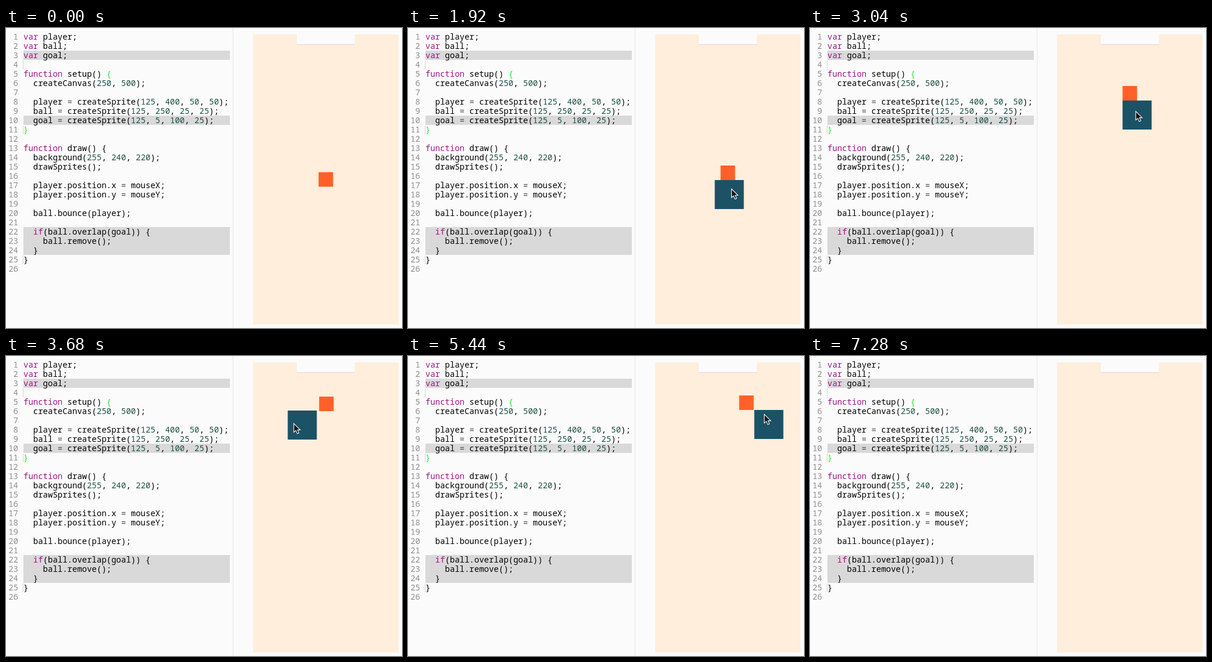
Animation of 681 by 517 pixels, one loop 7520 ms. Source, as an HTML page:

```html
<!DOCTYPE html>
<html lang="en">
<head>
<meta charset="utf-8">
<title>Push the ball to the goal</title>
<style>
  html, body { margin: 0; width: 100%; height: 100%; overflow: hidden; background: #fbfbfb; }
  svg { display: block; width: 681px; height: 517px; }
  text { font: 500 14px "Noto Sans Mono", "DejaVu Sans Mono", monospace; white-space: pre; fill: #000; }
  .num { fill: #8f8f8f; text-anchor: end; }
  .keyword { fill: #9c1583; }
  .number { fill: #1d5145; }
  .operator { fill: #444; }
  .match { fill: #1eea2c; }
</style>
</head>
<body>
<svg viewBox="0 0 681 517">
  <defs><clipPath id="canvas"><rect x="425" y="11" width="250" height="500"/></clipPath></defs>
  <rect width="681" height="517" fill="#fbfbfb"/>
  <path d="M30 39h355v16H30zM30 151h355v16H30zM30 343h355v48H30z" fill="#d9d9d9"/>
  <path d="M29.5 56v15M29.5 168v15M29.5 392v15" stroke="#d4d4d4"/>
  <path d="M390.5 0v517" stroke="#e6e6e6"/>
  <g id="code"></g>
  <rect x="425" y="11" width="250" height="500" fill="#ffeedb"/>
  <g clip-path="url(#canvas)">
    <rect x="500" y="11" width="100" height="17" fill="#fbfbfb"/>
    <path d="M500 28.5h100" stroke="#f3c8e6"/>
    <rect id="player" width="50" height="50" fill="#1b5266"/>
    <rect id="ball" width="25" height="25" fill="#ff6029"/>
  </g>
  <path id="cursor" d="M0 0V15L3.5 12 6 17.5 8.7 16.4 6.3 11H11Z" fill="#111" stroke="#fff" stroke-width="1.1"/>
</svg>
<script>
const LOOP = 7520, STEP = 80, LEAD = 60;
const $ = id => document.getElementById(id);

const source = `var player;
var ball;
var goal;

function setup() {
  createCanvas(250, 500);

  player = createSprite(125, 400, 50, 50);
  ball = createSprite(125, 250, 25, 25);
  goal = createSprite(125, 5, 100, 25);
}

function draw() {
  background(255, 240, 220);
  drawSprites();

  player.position.x = mouseX;
  player.position.y = mouseY;

  ball.bounce(player);

  if(ball.overlap(goal)) {
    ball.remove();
  }
}
`;

function highlight(line, row) {
  if (row === 4 || row === 10) line = line.replace(/[{}]/, '<tspan class="match">$&</tspan>');
  return line
    .replace(/ = /, ' <tspan class="operator">=</tspan> ')
    .replace(/\b\d+\b/g, '<tspan class="number">$&</tspan>')
    .replace(/\b(var|function|if)\b/, '<tspan class="keyword">$&</tspan>');
}

$('code').innerHTML = source.split('\n').map((line, row) => {
  const y = 20 + row * 16;
  return `<text class="num" x="21" y="${y}">${row + 1}</text>` +
    `<text x="30" y="${y}">${highlight(line, row)}</text>`;
}).join('');

// Turning points of the mouse, joined by a smooth curve
const path = [
  { t: 720, x: 464, y: 535 },
  { t: 1440, x: 500, y: 360 },
  { t: 1920, x: 552, y: 287 },
  { t: 2560, x: 583, y: 212 },
  { t: 3040, x: 562, y: 150 },
  { t: 3200, x: 559, y: 144 },
  { t: 3340, x: 559, y: 144 },
  { t: 3680, x: 509, y: 119 },
  { t: 3920, x: 460, y: 120 },
  { t: 4320, x: 544, y: 84 },
  { t: 4560, x: 505, y: 130 },
  { t: 4800, x: 562, y: 171 },
  { t: 5280, x: 628, y: 150 },
  { t: 5760, x: 589, y: 59 },
  { t: 6590, x: 589, y: 59 },
  { t: 7280, x: 570, y: 580 }
];

const same = (a, b) => a.x === b.x && a.y === b.y;

function slope(i, axis) {
  const a = path[i - 1], b = path[i], c = path[i + 1];
  if (!a || !c || same(a, b) || same(b, c)) return 0;
  return (c[axis] - a[axis]) / (c.t - a.t);
}

function mouseAt(t) {
  const last = path.length - 1;
  t = Math.min(Math.max(t, path[0].t), path[last].t);
  let i = 0;
  while (i < last - 1 && path[i + 1].t <= t) i++;
  const a = path[i], b = path[i + 1], span = b.t - a.t;
  const u = (t - a.t) / span, v = 1 - u;
  return ['x', 'y'].map(k =>
    v * v * ((1 + 2 * u) * a[k] + u * span * slope(i, k)) +
    u * u * ((1 + 2 * v) * b[k] - v * span * slope(i + 1, k)));
}

const clamp = (v, low, high) => Math.max(low, Math.min(high, v));

// The player moves the ball up, then right, then up into the goal.
function ballAt(t, [x, y]) {
  if (t < 3680) return [537.5, clamp(y - 50, 70, 248.5)];
  if (t < 4320) return [clamp(x + 25, 538.5, 569.5), 70];
  return [569.5, t < 5440 ? 70 : Math.min(70, y - 50)];
}

function move(el, [x, y]) {
  el.setAttribute('transform', `translate(${x} ${y})`);
}

function show(el, on) {
  el.setAttribute('visibility', on ? 'visible' : 'hidden');
}

function draw(time) {
  const t = Math.floor(time % LOOP / STEP) * STEP;
  const mouse = mouseAt(t).map(Math.round);
  const [tipX, tipY] = mouseAt(t + LEAD);
  const active = t >= 720 && t < 7280;
  move($('player'), [mouse[0] - 24.5, mouse[1] - 25]);
  move($('cursor'), [tipX, tipY - 2]);
  move($('ball'), ballAt(t, mouse));
  show($('player'), active);
  show($('cursor'), active);
  show($('ball'), t < 5680);
}

const start = performance.now();
function tick() {
  draw(performance.now() - start);
  requestAnimationFrame(tick);
}
tick();
</script>
</body>
</html>
```
